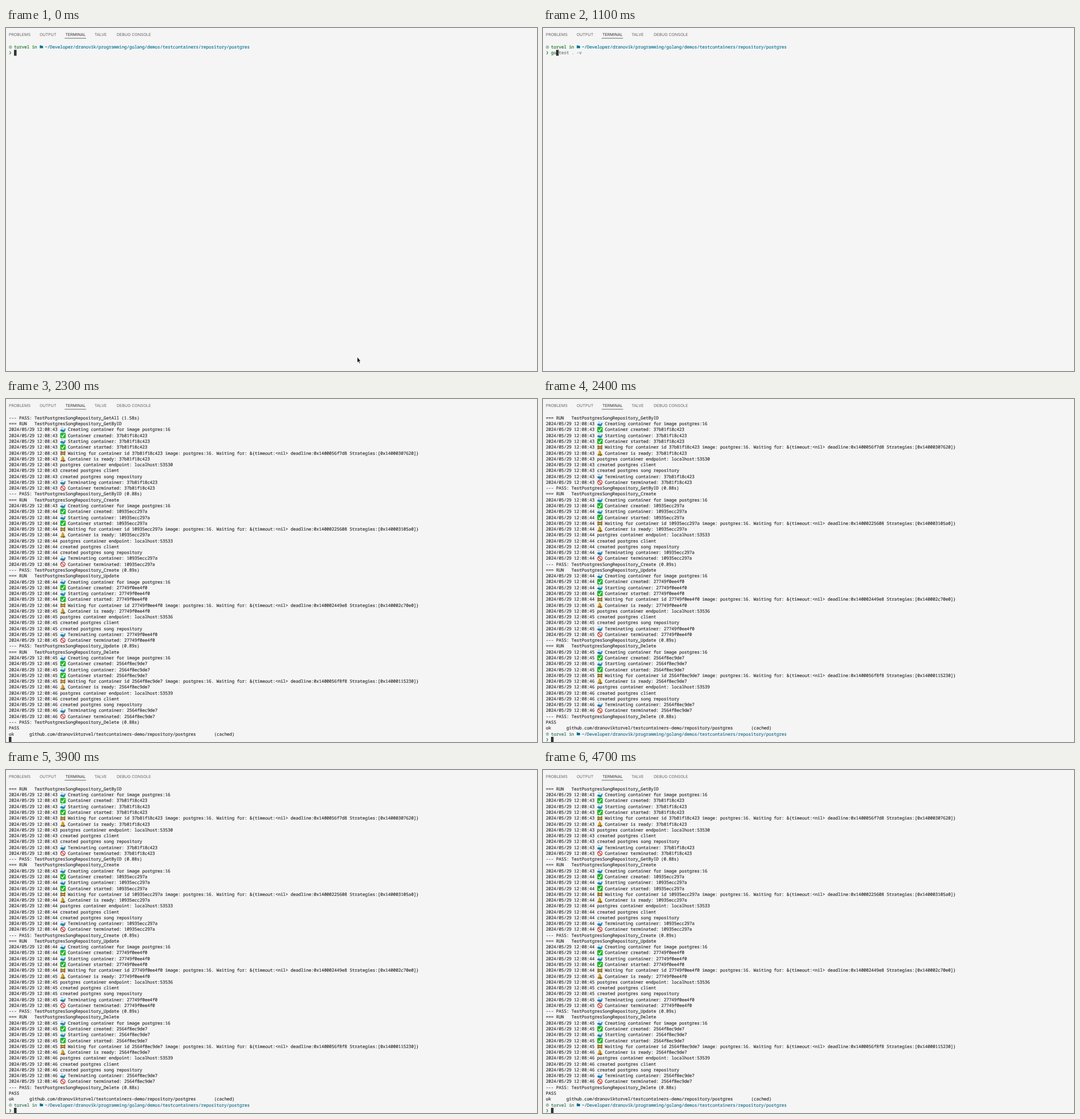
Animation of 930 by 602 pixels, one loop 5.07 s. Source, as an HTML page:

```html
<!DOCTYPE html>
<html lang="en">
<head>
<meta charset="utf-8">
<title>Terminal test run</title>
<style>
html, body { margin: 0; width: 100%; height: 100%; overflow: hidden; background: #f5f5f5; }
svg { display: block; width: 930px; height: 602px; }
text { white-space: pre; text-rendering: geometricPrecision; }
.mono { --ink: #2e2e2e; font: 7.7px "Noto Sans Mono", monospace; letter-spacing: -.127px; fill: var(--ink); stroke: var(--ink); stroke-width: .16; }
.tab { font: 7px Inter, sans-serif; fill: #646464; }
.mono.green { --ink: #1b7527; }
.mono.blue { --ink: #0b7495; }
.mono.ghost { --ink: #777; }
#end .green { --ink: #2f6f56; }
#end .blue { --ink: #1a6f8a; }
</style>
</head>
<body>
<svg id="stage" viewBox="0 0 930 602">
  <defs>
    <g id="whale">
      <path d="M.2 5.4Q2.8 4 5.6 5.3Q7.4 5.9 7.6 4.6Q6.3 4.3 6.2 3.1Q7.6 3 8.1 3.9Q8.6 3 9.8 3.1Q9.7 4.5 8.9 4.9Q9.2 9.6 4.8 9.7Q.1 9.7 .2 5.4Z" fill="#2b86b4"/>
      <path d="M.5 7.6Q2.8 8 5 9.5Q1.2 9.9 .5 7.6Z" fill="#cfe6f1"/>
      <path d="M3.2 4.4V2.2M3.2 2.3Q2.6 1 1.4 1.8M3.2 2.3Q3.8 1 5 1.8" fill="none" stroke="#6bb4d8" stroke-width=".8"/>
      <circle cx="2" cy="6.5" r=".4" fill="#17384a"/>
    </g>
    <g id="check">
      <rect x=".2" y=".4" width="9.5" height="9.5" rx="1.6" fill="#1fb92a"/>
      <path d="M2.3 5.4L4.2 7.7L7.5 2.4" fill="none" stroke="#fff" stroke-width="1.4"/>
    </g>
    <g id="barrier">
      <path d="M1.7 2V9.4M8 2V9.4" stroke="#5c5648"/>
      <path d="M.3 3H9.5V5H.3ZM.3 6H9.5V8H.3Z" fill="#e6ad2a"/>
      <path d="M1 5L2.5 3M3.8 5L5.3 3M6.6 5L8.1 3M1 8L2.5 6M3.8 8L5.3 6M6.6 8L8.1 6" stroke="#3b3320" stroke-width="1.2"/>
      <path d="M1 1.4H2.5V2.8H1ZM7.2 1.4H8.7V2.8H7.2Z" fill="#df5034"/>
    </g>
    <g id="bell">
      <path d="M.5 8.2Q2.1 6.9 2.2 4.2Q2.5 1.4 4.3 1.3Q6.6 1.4 7 4.2Q7.4 6.6 9.4 8.2Z" fill="#c9952a"/>
      <path d="M.4 8H9.4L8.6 9.3H1.2Z" fill="#775019"/>
      <path d="M3.4 6.9Q3.1 3.9 4.2 2.2" fill="none" stroke="#f0d273" stroke-width=".8"/>
      <circle cx="6" cy="9" r="1" fill="#4e3714"/>
      <circle cx="4.2" cy="1.1" r=".6" fill="#94651b"/>
    </g>
    <g id="stop" fill="none" stroke="#d03a33" stroke-width="1.3">
      <circle cx="4.8" cy="5.2" r="3.9"/>
      <path d="M2.1 2.5L7.5 7.9"/>
    </g>
    <g id="user" fill="none" stroke="#4c8a62" stroke-width=".65">
      <circle cx="2.7" cy="5.4" r="2.35"/>
      <circle cx="2.7" cy="4.7" r=".75"/>
      <path d="M1.1 7Q2.7 5.5 4.3 7"/>
    </g>
    <path id="folder" d="M.2 2.9Q.2 2.5 .6 2.5H2.4L3.1 3.2H5.6Q6 3.2 6 3.6V7.1Q6 7.5 5.6 7.5H.6Q.2 7.5 .2 7.1Z" fill="#0b7495"/>
    <path id="chevron" d="M1.3 2.5Q3.2 3.8 3.2 5.1Q3.2 6.4 1.3 7.7" fill="none" stroke="#1c6b2d" stroke-width="1.1"/>
  </defs>
  <rect width="930" height="602" fill="#f5f5f5"/>
  <g id="tabs"></g>
  <g id="shell"></g>
  <g id="log"><g id="lines"></g><g id="end"></g></g>
  <rect id="caret" width="4.5" height="10.27" fill="#333"/>
  <path id="mouse" d="M615.2 577.6V587.2L617.3 585.3L618.8 588.8L620.2 588.2L618.7 584.8L621.2 584.7Z" fill="#000" stroke="#fff" stroke-width=".6"/>
</svg>
<script>
const LOOP = 5070, LEFT = 5, TOP = 28.1, COL = 4.493, ROW = 10.27;
const NS = 'http://www.w3.org/2000/svg';
const $ = id => document.getElementById(id);
const colX = c => LEFT + c * COL;
const rowY = r => TOP + r * ROW;

function add(parent, tag, attrs, content = '') {
  const el = document.createElementNS(NS, tag);
  for (const key in attrs) el.setAttribute(key, attrs[key]);
  el.textContent = content;
  return parent.appendChild(el);
}
const write = (parent, row, col, str, tone = '') =>
  add(parent, 'text', { class: 'mono ' + tone, x: colX(col), y: rowY(row) + 7.85 }, str);
const icon = (parent, name, row, col) =>
  add(parent, 'use', { href: '#' + name, x: colX(col), y: rowY(row) });
const show = (el, on) => { el.style.display = on ? '' : 'none'; };

function prompt(parent, row) {
  icon(parent, 'user', row, 0);
  write(parent, row, 2, 'torvel in', 'green');
  icon(parent, 'folder', row, 12);
  write(parent, row, 14, '~/Developer/dranovik/programming/golang/demos/testcontainers/repository/postgres', 'blue');
  icon(parent, 'chevron', row + 1, 0);
}

function buildTabs() {
  const tabs = [[5, 'PROBLEMS'], [59, 'OUTPUT'], [104, 'TERMINAL'], [155, 'TALVE'], [194, 'DEBUG CONSOLE']];
  for (const [x, name] of tabs) {
    const label = add($('tabs'), 'text', { class: 'tab', x, y: 14.3 }, name);
    if (name === 'TERMINAL') label.style.fill = '#333';
  }
  add($('tabs'), 'rect', { x: 102.7, y: 17.6, width: 37.6, height: .8, fill: '#444' });
}

// One test: name, container id, port, addresses, run time, start second, step where the second ticks over
const tests = [
  ['GetByID', '37b81f18c423', 53530, '1400056f7d8', '14000307620', '0.88', 43, 99],
  ['Create', '10935ecc297a', 53533, '14000225608', '140003105a0', '0.89', 43, 1],
  ['Update', '27749f0ee4f0', 53536, '140002449e8', '140002c70e0', '0.89', 44, 5],
  ['Delete', '2564f8ec9de7', 53539, '1400056f8f8', '14000115230', '0.88', 45, 5]
];

function buildLog(log) {
  let row = 0;
  const line = str => write(log, row++, 0, str);
  const suite = 'TestPostgresSongRepository_';
  line(`--- PASS: ${suite}GetAll (1.58s)`);
  for (const [name, id, port, deadline, strategy, took, sec, tick] of tests) {
    line(`=== RUN   ${suite}${name}`);
    const steps = [
      ['whale', 'Creating container for image postgres:16'],
      ['check', `Container created: ${id}`],
      ['whale', `Starting container: ${id}`],
      ['check', `Container started: ${id}`],
      ['barrier', `Waiting for container id ${id} image: postgres:16. Waiting for: &{timeout:<nil> deadline:0x${deadline} Strategies:[0x${strategy}]}`],
      ['bell', `Container is ready: ${id}`],
      ['', `postgres container endpoint: localhost:${port}`],
      ['', 'created postgres client'],
      ['', 'created postgres song repository'],
      ['whale', `Terminating container: ${id}`],
      ['stop', `Container terminated: ${id}`]
    ];
    steps.forEach(([mark, msg], i) => {
      write(log, row, 0, `2024/05/29 12:08:${sec + (i >= tick)}`);
      if (mark) icon(log, mark, row, 20);
      write(log, row++, mark ? 23 : 20, msg);
    });
    line(`--- PASS: ${suite}${name} (${took}s)`);
  }
  line('PASS');
  write(log, row, 0, 'ok');
  write(log, row, 8, 'github.com/dranoviktorvel/testcontainers-demo/repository/postgres');
  write(log, row, 80, '(cached)');
}

const command = 'go test . -v';
const shell = $('shell'), log = $('log'), lines = $('lines'), end = $('end');

buildTabs();
prompt(shell, 0);
const typed = write(shell, 1, 2, '', 'green');
const rest = write(shell, 1, 4, '');
const dotLine = add(shell, 'rect', { x: colX(10), y: 47.3, width: COL, height: .7, fill: '#333' });
buildLog(lines);
prompt(end, 54);

// The clip keeps the scrolled-off line out of the tab bar
const clip = add(document.querySelector('defs'), 'clipPath', { id: 'view' });
add(clip, 'rect', { y: TOP, width: 930, height: 602 - TOP });
log.setAttribute('clip-path', 'url(#view)');

function draw(t) {
  const count = t < 900 ? 0 : t < 1000 ? 1 : 2;
  const accepted = t >= 1500, entered = t >= 2100;
  const printed = t >= 2300, done = t >= 2400;

  show($('mouse'), t < 200);
  show(shell, !printed);
  show(log, printed);
  show(end, done);
  show(dotLine, accepted);
  lines.setAttribute('transform', `translate(0 ${done ? -ROW : 0})`);

  typed.textContent = command.slice(0, count);
  // The caret block hides the first suggested letter
  const from = accepted ? 2 : count + 1;
  rest.textContent = count ? command.slice(from) : '';
  rest.setAttribute('x', colX(2 + from));
  rest.setAttribute('class', accepted ? 'mono' : 'mono ghost');

  const [row, col] = done ? [55, 2] : printed ? [55, 0] : entered ? [2, 0]
    : accepted ? [1, 2 + command.length] : [1, 2 + count];
  $('caret').setAttribute('x', colX(col));
  $('caret').setAttribute('y', rowY(row));
}

const start = performance.now();
function frame() {
  draw((performance.now() - start) % LOOP);
  requestAnimationFrame(frame);
}
frame();
</script>
</body>
</html>
```
